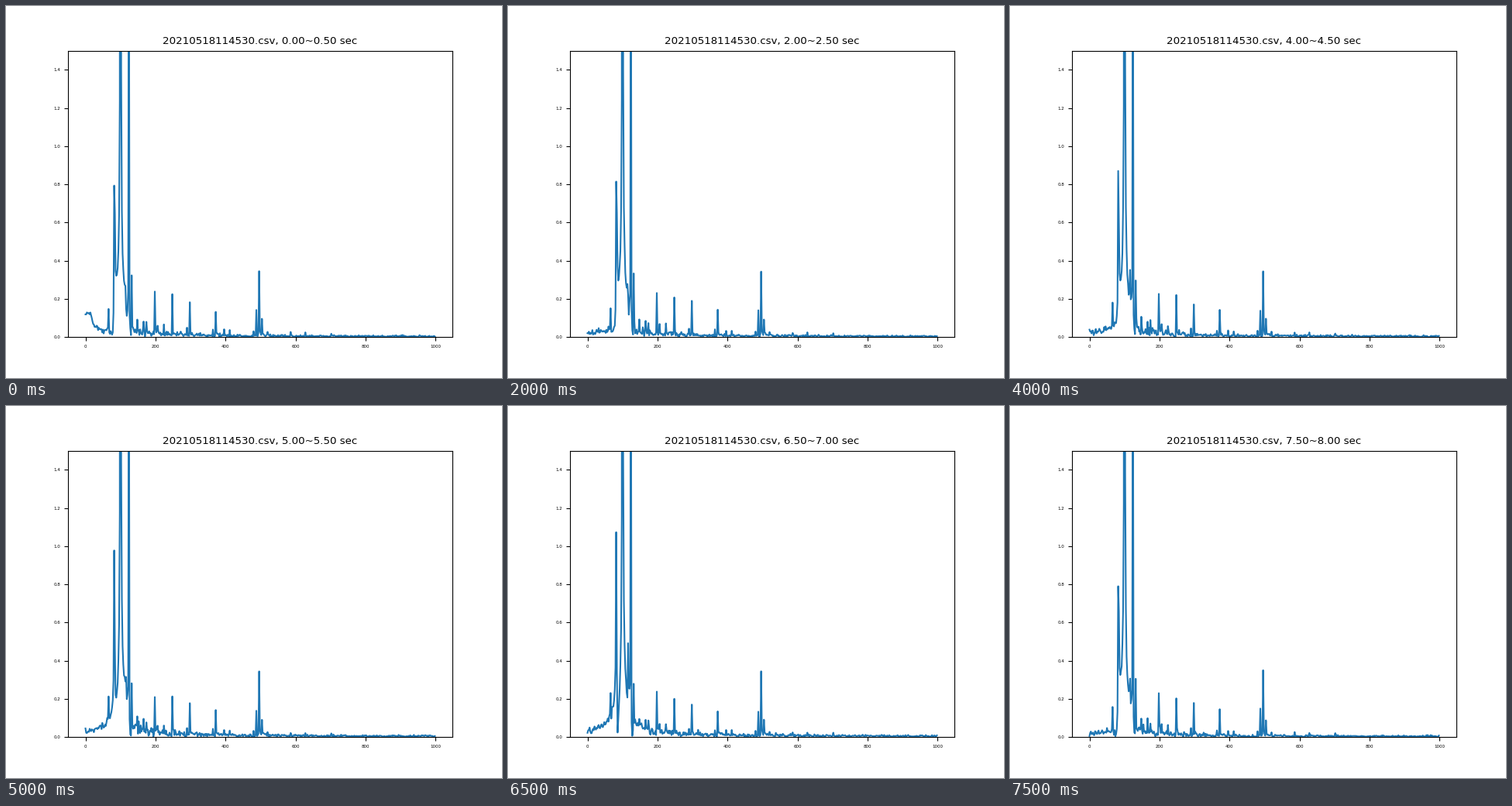
These frames come from a looping animation (640 px wide and 480 px high, 8 s). A matplotlib script:

```python
import numpy as np
import matplotlib.pyplot as plt
from matplotlib.animation import FuncAnimation

plt.rcParams["font.size"] = 8

STEP = 0.5
FRAMES = 16
DETUNE = 0.16
freq = np.arange(0, 1000, 2)

# Broad tones (Hz, signed strength): they leak as 1 / distance and beat
TONES = [(82.698, -.65), (100 + DETUNE, 2.6), (115.6, -.13),
         (124 + DETUNE, -.35)]
# Narrow peaks: bin and height
PEAKS = {66: .12, 132: .33, 198: .245, 248: .227, 298: .19,
         372: .148, 488: .137, 496: .352, 504: .104}
# Faint bumps whose height falls off as 1 / frequency
BUMPS = [148, 166, 174, 206, 224, 290, 364, 396, 412, 480, 520, 586, 628, 702]

tones = TONES + [(f + DETUNE, a * DETUNE) for f, a in PEAKS.items()]


def spectrum(i):
    t = i * STEP
    rng = np.random.default_rng(100 + i)

    noise = rng.normal(size=freq.size) + 1j * rng.normal(size=freq.size)
    total = noise * (.003 + .012 * np.exp(-abs(freq - 150) / 120))
    for f, strength in tones:
        total += strength * np.exp(2j * np.pi * f * t) / (freq - f)

    # Slow drift that dies out just after the start
    total += .13j * np.exp(-4 * t) / (1 + ((freq - 8) / 16) ** 2)

    amp = abs(total)
    for f in BUMPS:
        k = f // 2
        amp[k] = max(amp[k], 15 / f * rng.uniform(.8, 1.1))
    return amp


fig, ax = plt.subplots(figsize=(6.4, 4.8), dpi=100)
line, = ax.plot(freq, spectrum(0))
ax.set_ylim(0, 1.5)
ax.tick_params(labelsize=4)
title = ax.set_title("")


def update(i):
    t = i * STEP
    line.set_ydata(spectrum(i))
    title.set_text(f"20210518114530.csv, {t:.2f}~{t + STEP:.2f} sec")
    return line, title


anim = FuncAnimation(fig, update, frames=FRAMES, interval=1000 * STEP,
                     repeat=True, repeat_delay=0, blit=False)
plt.show()
```
